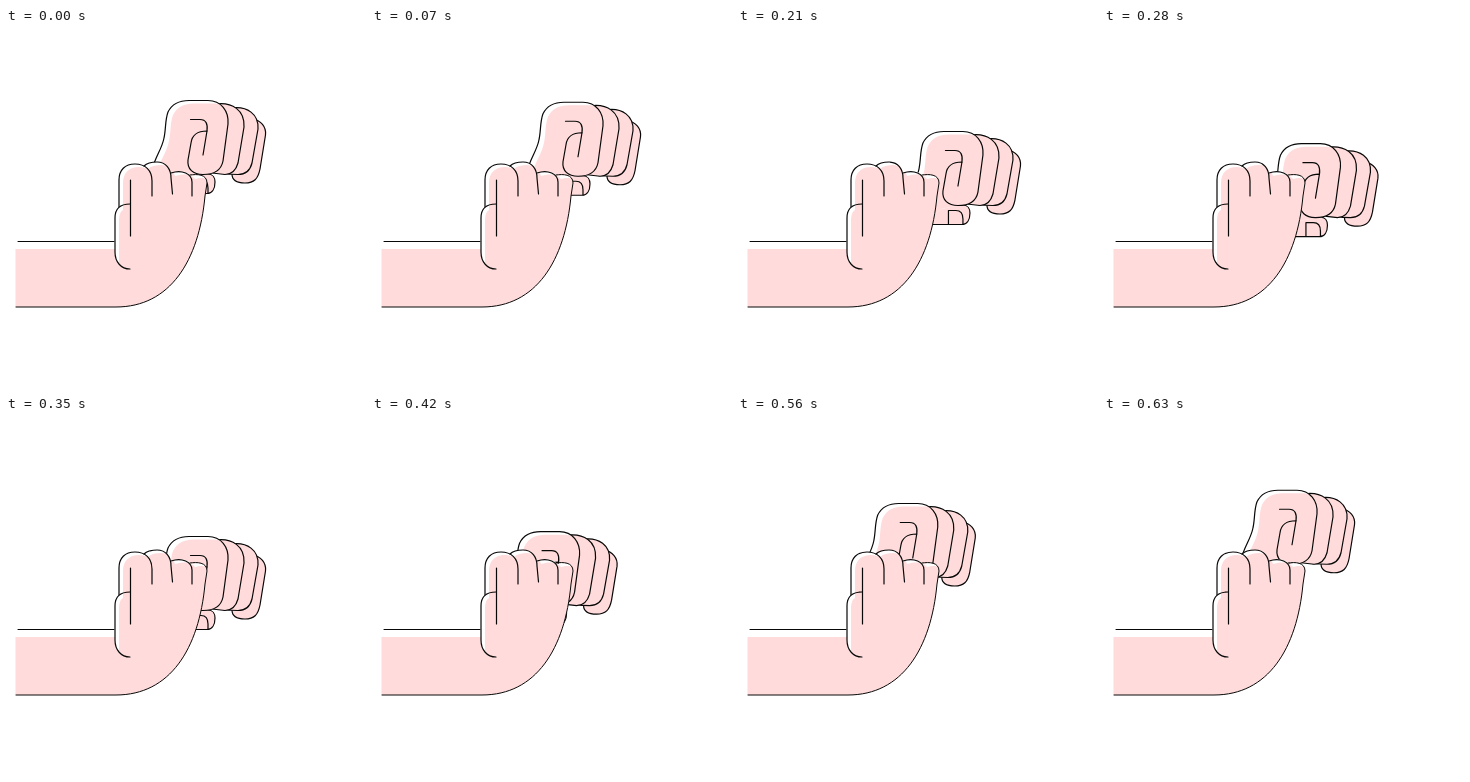
An HTML page for the animation above (700 ms loop, 360 by 360 pixels).

```html
<!DOCTYPE html>
<html lang="en">
<head>
<meta charset="utf-8">
<title>Circling fists</title>
<style>
  html, body { margin: 0; width: 100%; height: 100%; overflow: hidden; background: #fff; }
  svg { display: block; width: 100vw; height: 100vh; }
  .line, .finger { stroke: #080808; stroke-width: 1.2; stroke-linecap: round; stroke-linejoin: round; }
  .line { fill: none; }
  .line .edge { stroke-width: 1; }
  .finger, .skin { fill: #ffdcdb; }
  .light { fill: #fff; }
</style>
</head>
<body>
<svg viewBox="0 0 360 360">
  <defs>
    <path id="fist-shape" d="M146 142 C149 129 156 121 158 110 C160 101 159 92 162 84 C166 76 173 72.500 183 72.500 H202 C215 72.500 223 83 222 96 L217 133 C215 143 208 146.500 197 146.500 L180 150 L168 160 Z"/>
    <path id="hand-shape" d="M109 279 V190 C109 183 111 180 113 179 V152 C113 142 119 136 129 136 C133 136 136 137 138 138 C141 135 146 134 151 134 C158 134 163 138 165 145 C171 143 181 142 185 148 C191 146 201 146 201 155 L199 168 C193 233 164 279 110 279 Z"/>
    <clipPath id="fist-clip"><use href="#fist-shape"/></clipPath>
    <clipPath id="hand-clip"><use href="#hand-shape"/></clipPath>
  </defs>

  <g id="fist">
    <path class="finger" d="M170 146 H202 C207 146 209 150 209 154 C209 161 206 165.500 201 165.500 H170 Z"/>
    <path class="line" d="M187.500 165 V151.500 H195 C200 151.500 202 154 202 160 V165"/>
    <path class="finger" d="M246 91 C255 92 260.500 99 259.500 107 L254 141 C252 151 248 155 239 155 C230 155 226 152 226 146 Z"/>
    <path class="finger" d="M226 80 C241 78 253 86 252 101 L246 135 C244 143 240 146.500 232 146.500 L218 146 Z"/>
    <path class="finger" d="M210 76 C226 74 239 82 238 99 L232 135 C230 142 226 146.500 219 146.500 L206 145 Z"/>
    <use class="light" href="#fist-shape"/>
    <g clip-path="url(#fist-clip)"><use class="skin" href="#fist-shape" x="5" y="3"/></g>
    <path class="line" d="M146 142 C149 129 156 121 158 110 C160 101 159 92 162 84 C166 76 173 72.500 183 72.500 H202 C215 72.500 223 83 222 96 L217 133 C215 143 208 146.500 197 146.500 C187 146.500 181 141 182 132 L185 115 C186 107 191 103 201 103 L197 127"/>
    <path class="line" d="M184.500 91.500 H194 C200 91.500 202 96 201 103"/>
  </g>

  <rect class="skin" x="9.500" y="221" width="100" height="58"/>
  <use class="light" href="#hand-shape"/>
  <g clip-path="url(#hand-clip)">
    <use class="skin" href="#hand-shape" x="4" y="3"/>
    <path class="skin" d="M109 229 C111 237 116 242 124 242 V279 H109 Z"/>
  </g>
  <g class="line">
    <path class="edge" d="M12 213.500 H108"/>
    <path class="edge" d="M10 279 H110 C164 279 193 233 199 168 L201 155 C201 146 191 146 184 147"/>
    <path d="M113 179 V152 C113 142 119 136 129 136 C139 136 146 142 146 153 V168"/>
    <path d="M138 138 C141 135 146 134 151 134 C160 134 165 141 165 150 L166.500 166"/>
    <path d="M165 145 C176 141 186 146 186 154 V168"/>
    <path d="M124.500 152 V208"/>
    <path d="M124 176 C114 176 109 181 109 190 V224 C109 234 115 241 124 241"/>
  </g>
</svg>
<script>
  const STEP = 70, STEPS = 10, RADIUS = 24;
  // Angles of the downward half turn; the way up mirrors them.
  const halfTurn = [0, 22, 68, 107, 143, 180];
  const fist = document.getElementById('fist');

  function draw(time) {
    const step = Math.floor(time / STEP) % STEPS;
    const rising = step > STEPS / 2;
    const angle = halfTurn[rising ? STEPS - step : step] * Math.PI / 180;
    const x = RADIUS * Math.sin(angle) * (rising ? -1 : 1);
    const y = RADIUS * (1 - Math.cos(angle));
    fist.setAttribute('transform', `translate(${x.toFixed(2)} ${y.toFixed(2)})`);
  }

  const start = performance.now();
  function tick() {
    draw(performance.now() - start);
    requestAnimationFrame(tick);
  }
  tick();
</script>
</body>
</html>
```
